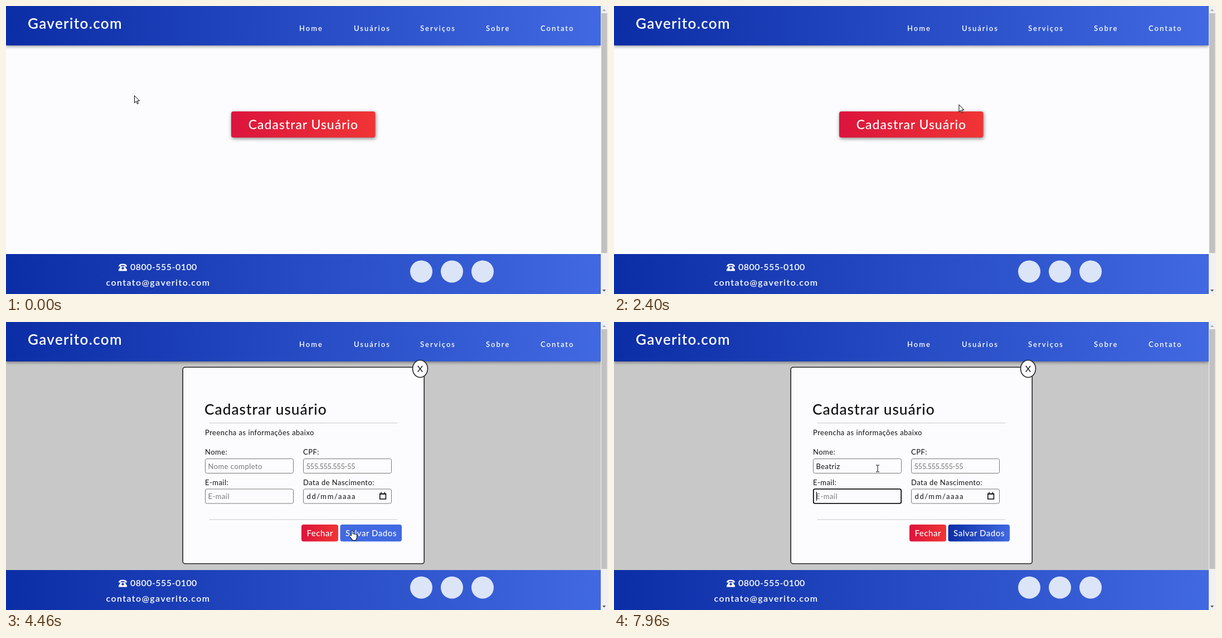
These frames come from a looping animation (1080x519 px, 8 s). An HTML page:

```html
<!DOCTYPE html>
<html lang="pt-BR">
<head>
<meta charset="utf-8">
<title>Cadastrar usuário</title>
<style>
  html, body { margin: 0; height: 100%; overflow: hidden; background: #fcfcfe; }
  svg { display: block; width: 100vw; height: 100vh; }
  text { font: 13px Lato, "Open Sans", sans-serif; letter-spacing: .036em; fill: #111; white-space: pre; }
  .mid { text-anchor: middle; }
  .brand { font-size: 26px; font-weight: 600; fill: #fff; letter-spacing: .052em; }
  .nav text { font-weight: 600; letter-spacing: 2px; fill: #fff; }
  .foot text { font-size: 16px; font-weight: 600; fill: #fff; }
  .call { font-size: 23px; font-weight: 500; fill: #fff; letter-spacing: .042em; }
  .head { font-size: 26.4px; font-weight: 500; }
  .act text { font-size: 15px; font-weight: 500; fill: #fff; }
  .hint { fill: #777; }
  .field { fill: #fcfcfe; stroke: #777; }
  .frame { fill: #fcfcfe; stroke: #222; stroke-width: 1.6; }
  .rule { stroke: #aaa; stroke-dasharray: 1 .5; }
  .bar { filter: drop-shadow(0 1px 3px rgba(0,0,0,.55)); }
  .lift { filter: drop-shadow(1px 2px 3px rgba(0,0,0,.5)); }
  #cursor path { fill: #fff; stroke: #000; stroke-linejoin: round; }
</style>
</head>
<body>
<svg viewBox="0 0 1080 519" preserveAspectRatio="none">
  <defs>
    <linearGradient id="blue"><stop stop-color="#0b2da6"/><stop offset="1" stop-color="#4169e1"/></linearGradient>
    <linearGradient id="red"><stop stop-color="#dc143c"/><stop offset="1" stop-color="#f03535"/></linearGradient>
  </defs>
  <rect width="1080" height="519" fill="#fcfcfe"/>

  <g id="call">
    <rect id="callBox" class="lift" x="404" y="190" width="258.5" height="47" rx="4"/>
    <text class="call mid" x="533.5" y="222">Cadastrar Usuário</text>
  </g>
  <!-- dims the page around the modal, not behind it -->
  <path id="shade" d="M0 40H1067V490H0zM317 81.500H750V435.500H317z" fill="#c8c8c8" fill-rule="evenodd"/>

  <rect class="bar" width="1067" height="71" fill="url(#blue)"/>
  <text class="brand" x="39" y="41">Gaverito.com</text>
  <g class="nav">
    <text x="526" y="45">Home</text>
    <text x="624" y="45">Usuários</text>
    <text x="743" y="45">Serviços</text>
    <text x="861" y="45">Sobre</text>
    <text x="959" y="45">Contato</text>
  </g>

  <g class="foot">
    <rect y="447" width="1067" height="72" fill="url(#blue)"/>
    <path d="M202 469.5q0-5 7.5-5t7.5 5h-4v-2q-3.500-1-7 0v2zM206 469h7l4 6v2.500h-15V475z" fill="#fff"/>
    <circle cx="209.500" cy="472.500" r="2.200" fill="#1a3cb2"/>
    <text x="223" y="476" style="letter-spacing:.45px">0800-555-0100</text>
    <text class="mid" x="273" y="504" style="letter-spacing:1.4px">contato@gaverito.com</text>
    <g fill="#dce4f8">
      <circle cx="745" cy="478.500" r="20"/>
      <circle cx="800" cy="478.500" r="20"/>
      <circle cx="855" cy="478.500" r="20"/>
    </g>
  </g>

  <rect x="1067" width="13" height="519" fill="#f1f1f1"/>
  <rect x="1068" y="13" width="10.500" height="432" fill="#c1c1c1"/>
  <path d="M1070 9h6l-3-3.500z" fill="#a3a3a3"/>
  <path d="M1070 511h6l-3 3.500z" fill="#505050"/>

  <g id="modal">
    <rect class="frame" x="317.200" y="81.500" width="433" height="354" rx="4"/>
    <ellipse class="frame" cx="743" cy="84.300" rx="13.500" ry="15.500"/>
    <text class="mid" x="743.300" y="90" style="font-size:16px">X</text>
    <text class="head" x="356" y="167">Cadastrar usuário</text>
    <path class="rule" d="M365 182H702M365 356H702"/>
    <text x="357" y="203.500">Preencha as informações abaixo</text>

    <text x="357" y="239">Nome:</text>
    <text x="533" y="239">CPF:</text>
    <text x="357" y="293.500">E-mail:</text>
    <text x="533" y="293.500">Data de Nascimento:</text>
    <g class="field">
      <rect x="357.500" y="246.500" width="158" height="26" rx="3"/>
      <rect x="533.500" y="246.500" width="158" height="26" rx="3"/>
      <rect x="357.500" y="301" width="158" height="26" rx="3"/>
      <rect x="533.500" y="301" width="158" height="26" rx="3"/>
    </g>
    <rect id="focus" x="357.800" width="157.400" height="26" rx="3" fill="none" stroke="#000" stroke-width="1.700"/>
    <text id="name" x="362.500" y="264.500"></text>
    <text class="hint" x="538.500" y="264.500" style="letter-spacing:-.45px">555.555.555-55</text>
    <text class="hint" x="362.500" y="319">E-mail</text>
    <text x="539.500" y="319" style="letter-spacing:1.600px">dd/mm/aaaa</text>
    <path d="M670.800 309.500h10.600v9.600h-10.600zM670.800 310h10.600M673 306.500v2M679.300 306.500v2" fill="none" stroke="#000" stroke-width="1.500"/>
    <rect id="caret" width="1" height="16" fill="#000"/>

    <g class="act">
      <rect x="530" y="365" width="66" height="30.500" rx="4" fill="url(#red)"/>
      <rect id="save" x="599.500" y="365" width="110.500" height="30.500" rx="4"/>
      <text class="mid" x="563.300" y="385.500">Fechar</text>
      <text class="mid" x="655" y="385.500">Salvar Dados</text>
    </g>
  </g>

  <g id="alert">
    <rect class="frame" x="395.500" y="64.700" width="275" height="43" rx="3" style="stroke:#000"/>
    <text x="457" y="91">Corrija o campo nome</text>
    <path d="M596 79h10.500l-5.250 10z" fill="#e33238"/>
  </g>

  <g id="cursor">
    <path id="arrow" d="M.5.5V13.500L3.500 10.700 5.600 15.500 7.500 14.700 5.400 9.900H9.500z"/>
    <path id="hand" d="M-1.300 10V1.300Q0-.8 1.300 1.300V7Q2.600 5.600 3.900 7.400 5.200 6.200 6.400 8 8.300 7 8.500 9.500V13.500L7 16.500V18.500H0V16.500L-5 10.500Q-4.500 8.200-2.800 9.200z"/>
    <path id="beam" d="M-3-6h2.200L0-5.300.8-6H3M0-5.300V5.300M-3 6h2.200L0 5.300.8 6H3" style="fill:none"/>
  </g>
</svg>

<script>
const LOOP = 8000;
const $ = id => document.getElementById(id);
const set = (id, attrs) => { for (const k in attrs) $(id).setAttribute(k, attrs[k]); };
const show = (id, on) => set(id, { visibility: on ? "visible" : "hidden" });
const clamp = u => Math.min(1, Math.max(0, u));
const smooth = u => u * u * (3 - 2 * u);
const easeOut = u => 1 - (1 - u) ** 2.5;

// time, x, y of the pointer's hot spot
const route = [
  [0, 230, 161], [150, 230, 161], [850, 530, 215], [1150, 530, 215],
  [1500, 649, 64], [1900, 649, 64], [2600, 611, 205], [3400, 611, 205],
  [3710, 528, 213], [3800, 528, 213], [4350, 621, 375], [4800, 621, 375],
  [5500, 546, 190], [5900, 546, 190], [6500, 473, 264], [LOOP, 473, 264]
];
const hovers = [[535, 1240], [2460, 3450]];
const OPEN = 3450, WARN = 4600, WARN_END = 6600, FOCUS = 6550, TYPE = 6850, TAB = 7850;
const NAME = "Beatriz";

function pointer(t) {
  const i = route.findIndex(k => k[0] > t);
  const [a, x, y] = route[i - 1], [b, x2, y2] = route[i];
  const u = smooth((t - a) / (b - a));
  return [x + (x2 - x) * u, y + (y2 - y) * u];
}

function slideIn(id, p, opacity = p) {
  set(id, { opacity, transform: `translate(0 ${-20 * (1 - p)})` });
}

function draw(t) {
  const [x, y] = pointer(t);
  const over = (l, top, w, h) => x >= l && x <= l + w && y >= top && y <= top + h;
  const opened = t >= OPEN;

  const hovered = hovers.some(([a, b]) => t >= a && t < b);
  const grow = Math.max(...hovers.map(([a, b]) => Math.min(clamp((t - a) / 300), 1 - clamp((t - b) / 300))));
  set("call", { transform: `translate(533.25 213.5) scale(${1 + .05 * grow}) translate(-533.25 -213.5)` });
  set("callBox", { fill: hovered ? "#ffb0b0" : "url(#red)" });

  const entry = easeOut(clamp((t - OPEN) / 500));
  slideIn("modal", entry);
  slideIn("shade", entry, clamp((t - OPEN) / 250));
  slideIn("alert", easeOut(clamp((t - WARN) / 400)) * (1 - clamp((t - WARN_END) / 300)));

  const saving = opened && over(599, 365, 111, 30);
  set("save", { fill: saving ? "#4169e1" : "url(#blue)" });

  const typed = NAME.slice(0, Math.max(0, Math.floor((t - TYPE) / 120) + 1));
  const name = $("name");
  name.textContent = typed || "Nome completo";
  name.setAttribute("class", typed ? "" : "hint");

  const onMail = t >= TAB, focused = t >= FOCUS;
  const lastKey = onMail ? TAB : Math.max(FOCUS, Math.min(t, TYPE + 120 * (NAME.length - 1)));
  show("focus", focused);
  set("focus", { y: onMail ? 301 : 246.5 });
  show("caret", focused && (t - lastKey) % 1000 < 500);
  set("caret", {
    x: typed && !onMail ? 363 + name.getComputedTextLength() : 363,
    y: onMail ? 306 : 251.5
  });

  const inField = opened && [357, 533].some(l => [246, 301].some(top => over(l, top, 158, 26)));
  const onAction = saving || hovered || (opened && over(530, 365, 66, 30));
  set("cursor", { transform: `translate(${x} ${y})` });
  show("hand", onAction);
  show("beam", inField);
  show("arrow", !onAction && !inField);
}

function tick() {
  draw(performance.now() % LOOP);
  requestAnimationFrame(tick);
}
tick();
</script>
</body>
</html>
```
